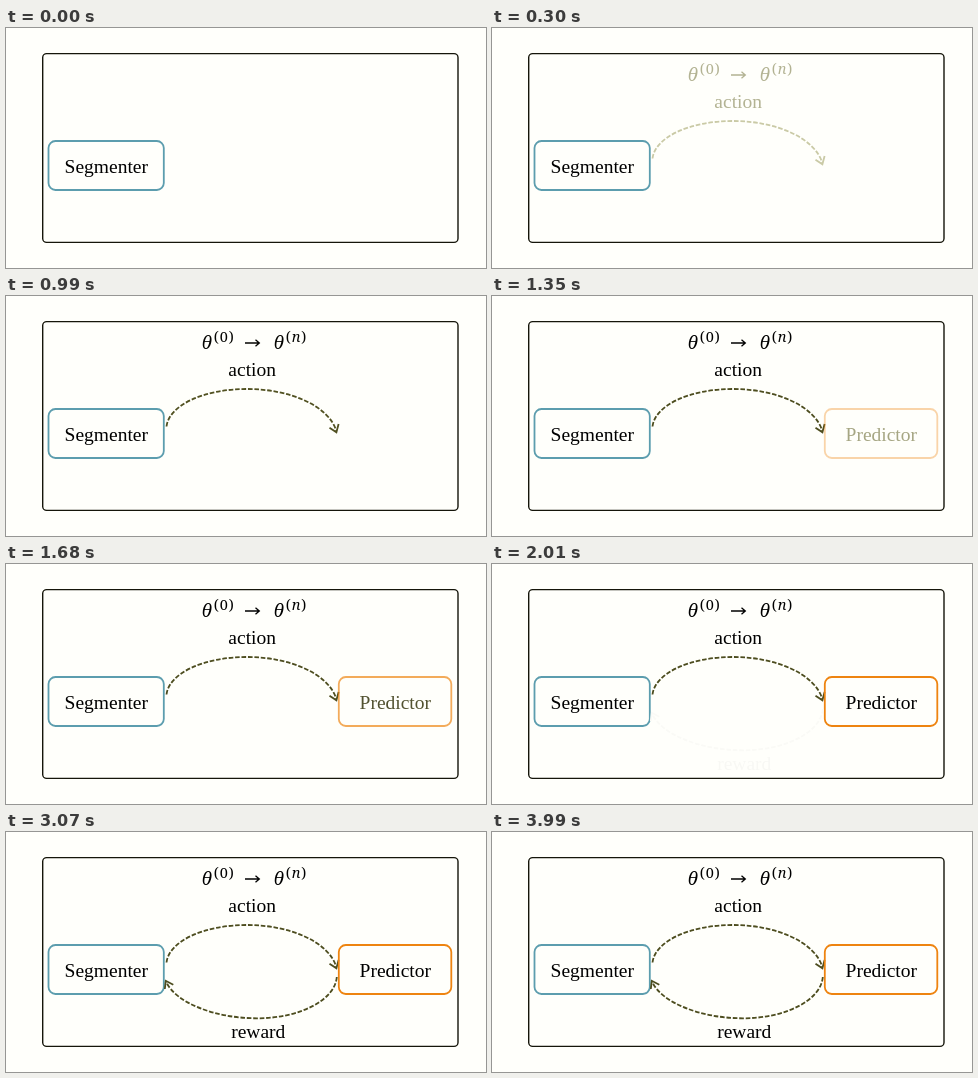
Recreate the animation shown at these times as an HTML page. Size 480 by 240 pixels, loop 5.01 s.

```html
<!DOCTYPE html>
<html lang="en">
<head>
<meta charset="utf-8">
<title>Segmenter and Predictor</title>
<style>
  html, body { margin: 0; width: 100%; height: 100%; overflow: hidden; background: #fffffb; }
  svg { display: block; width: 100%; height: 100%; }
  text { font: 19.5px "Liberation Serif", "Times New Roman", serif; text-anchor: middle; fill: var(--text, #000); }
  .math { font: italic 18px "Noto Serif", serif; text-anchor: start; }
  .sup { font-size: 14.5px; letter-spacing: 0.9px; }
  .up { font-style: normal; }
  path, rect { fill: none; stroke-width: 1.8; }
  .line { stroke: var(--line); }
  .dash { stroke-dasharray: 4.6 1.8; }
  .arrow { stroke: var(--text); stroke-width: 1.3; }
</style>
</head>
<body>
<svg viewBox="0 0 480 240">
  <rect x="36.7" y="25.6" width="415.3" height="188.8" rx="4" stroke="#15150a" style="stroke-width:1.4"/>
  <rect x="42.5" y="113" width="115.3" height="49" rx="7" stroke="#5c9dae"/>
  <text x="100.3" y="145">Segmenter</text>

  <g id="action">
    <text class="math" x="195.8" y="52.5">θ</text>
    <text class="math sup up" x="207.8" y="46">(0)</text>
    <path class="arrow" d="M239 47H253M249.5 43.8L253.3 47L249.5 50.2"/>
    <text class="math" x="267.8" y="52.5">θ</text>
    <text class="math sup" x="279.8" y="46"><tspan class="up">(</tspan>n<tspan class="up">)</tspan></text>
    <text x="246.2" y="79.5">action</text>
    <path class="line dash" d="M160.5 130.5C163 109 198 93 241 93S323 110 330.3 135"/>
    <path class="line" d="M323.5 131.8L330.4 136.3L332.6 128"/>
  </g>

  <g id="predictor">
    <rect id="box" x="332.8" y="113" width="112.5" height="49" rx="7" stroke="#ee8410"/>
    <text x="389.3" y="145">Predictor</text>
  </g>

  <g id="reward">
    <path class="line dash" d="M330.8 145C329 168 294 186.3 251 186.3S169 170 160.3 150"/>
    <path class="line" d="M158.8 157L159.8 148.8L167.3 152.8"/>
    <text x="252.3" y="206">reward</text>
  </g>
</svg>
<script>
const LOOP = 5010;
const $ = id => document.getElementById(id);
const fades = [["action", 0, 1010], ["predictor", 1000, 2000], ["reward", 1980, 3040]];

// Ink darkens from white through olive; `drop` is the final fall in brightness.
function ink(p, drop, olive) {
  const c = 255 - drop * p;
  return `rgb(${c}, ${c}, ${c * (1 - olive * p)})`;
}

function draw(now) {
  const t = now % LOOP;
  for (const [id, from, to] of fades) {
    const p = Math.min(1, Math.max(0, (t - from) / (to - from)));
    const g = $(id);
    g.style.visibility = p > 0.01 ? "visible" : "hidden";
    g.style.setProperty("--text", ink(p, 255, 0.6));
    g.style.setProperty("--line", ink(p, 178, 0.6));
    if (id === "predictor") $("box").style.strokeOpacity = p;
  }
}

let start;
function tick(now) {
  start ??= now;
  draw(now - start);
  requestAnimationFrame(tick);
}
draw(0);
requestAnimationFrame(tick);
</script>
</body>
</html>
```
